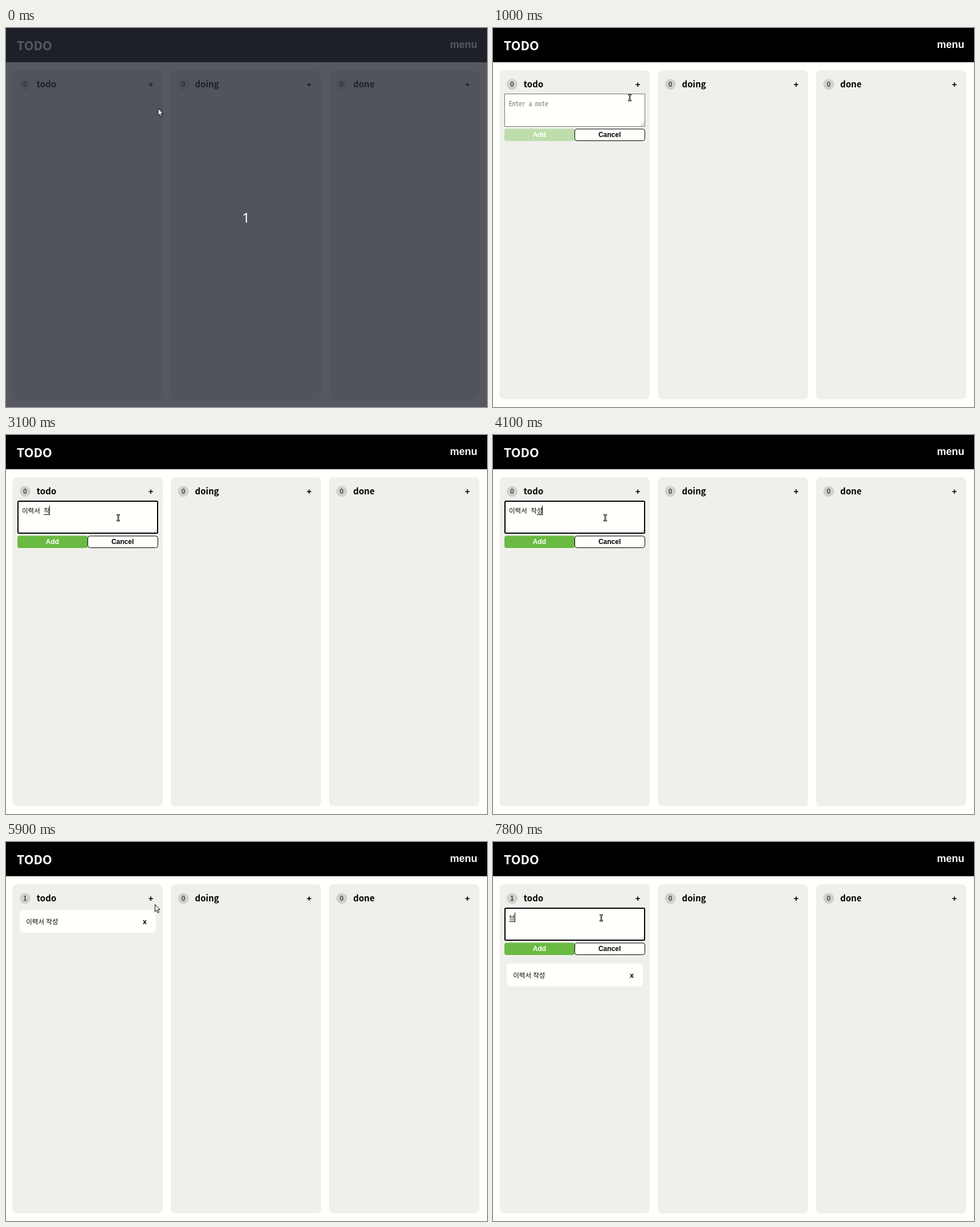
An HTML page for the animation above (8 s loop, 844 by 664 pixels).

```html
<!DOCTYPE html>
<html lang="ko">
<head>
<meta charset="utf-8">
<title>TODO board</title>
<style>
  html, body { margin: 0; width: 100%; height: 100%; overflow: hidden; background: #fffffc; }
  svg { display: block; width: 100vw; height: 100vh; }
  text { font: 11.52px 'Noto Sans CJK KR', 'Noto Sans CJK JP', 'Noto Sans CJK', sans-serif; white-space: pre; }
  .bold { font-weight: 700; }
  .button { font: 700 12px 'Liberation Sans', sans-serif; text-anchor: middle; }
  .mono { font-family: 'Noto Sans Mono CJK KR', 'Noto Sans Mono CJK JP', 'Noto Sans Mono CJK', 'Noto Sans Mono', monospace; }
  .count { text-anchor: middle; fill: #444; }
  #value { word-spacing: .276em; }
</style>
</head>
<body>
<svg viewBox="0 0 844 664">
  <rect width="844" height="664" fill="#fffffc"/>
  <rect width="844" height="60"/>
  <text class="bold" x="18.8" y="39" fill="#fffffc" style="font-size:21.8px">TODO</text>
  <text class="button" x="803" y="35" fill="#fffffc" style="font-size:18px">menu</text>
  <g id="columns"></g>

  <g id="card">
    <rect x="24" y="119" width="239" height="40" rx="7" fill="#fffffc"/>
    <text x="35.2" y="144">이력서 작성</text>
    <text class="button" x="243.4" y="144" style="font-size:12.5px">x</text>
  </g>

  <g id="form">
    <rect id="area" fill="#fffffc"/>
    <path d="M259.5 171.5l6-6M263 171.5l2.5-2.5" stroke="#777" stroke-width=".8"/>
    <text id="hint" class="mono" x="28" y="137" fill="#757575">Enter a note</text>
    <text id="value" x="28" y="137"></text>
    <rect id="underline" y="139" height="1"/>
    <rect id="caret" y="123.5" width="1" height="17"/>
    <rect id="add" x="20" y="176.5" width="123.5" height="21.5" rx="4"/>
    <rect id="ring" x="20" y="177" width="123" height="21" rx="4" fill="none" stroke="#000" stroke-width="2"/>
    <text class="button" x="81.5" y="191" fill="#fffffc">Add</text>
    <rect x="143.5" y="177" width="123" height="20.5" rx="4" fill="#fffffc" stroke="#000"/>
    <text class="button" x="204.6" y="191">Cancel</text>
  </g>

  <g id="countdown">
    <rect width="844" height="664" fill="#262a32" fill-opacity=".78"/>
    <text x="421" y="341" text-anchor="middle" fill="#fff" style="font:24px 'Noto Sans',sans-serif">1</text>
  </g>

  <g id="pointer" fill="#fff" stroke="#000" stroke-linejoin="round">
    <path id="arrow" d="M.5 .5V13L3.4 10.3 5.4 15 7.4 14.1 5.4 9.6H9Z"/>
    <path id="hand" d="M3.4 8V1.4Q4.3 0 5.2 1.4V4.6Q6.4 3.9 7 5Q8.3 4.4 8.9 5.5Q10.6 5 11.2 6.6V9.3L10 12.5H4.4L.8 8.3Q.5 6.5 2 7Z"/>
    <g id="beam" fill="none">
      <path d="M-3 -5H-1L0 -4.3 1 -5H3M-3 5H-1L0 4.3 1 5H3M0 -4.3V4.3" stroke-width="2.6"/>
      <path d="M-2.6 -5H-1L0 -4.3 1 -5H2.6M-2.6 5H-1L0 4.3 1 5H2.6M0 -4.3V4.3" stroke="#fff" stroke-width=".8"/>
    </g>
  </g>
</svg>
<script>
const LOOP = 8000, FONT = 11.52;
const $ = id => document.getElementById(id);
const show = (id, on) => $(id).style.display = on ? '' : 'none';
const set = (id, attrs) => Object.entries(attrs).forEach(([k, v]) => $(id).setAttribute(k, v));

$('columns').innerHTML = ['todo', 'doing', 'done'].map((name, i) => `
  <g transform="translate(${i * 277.75})">
    <rect x="11.5" y="74" width="263.5" height="576.5" rx="8" fill="#eff0ec"/>
    <circle cx="33.5" cy="98.7" r="9.5" fill="#d0d0cd"/>
    <text class="bold count" id="count${i}" x="33.5" y="103">0</text>
    <text class="bold" x="53.8" y="104" style="font-size:15px">${name}</text>
    <text class="button" x="254.1" y="103.6" style="font-size:15px">+</text>
  </g>`).join('');

// [time, pointer shape, x, y]
const moves = [
  [0, 'arrow', 266.5, 140.5], [100, 'arrow', 260, 130], [200, 'arrow', 257, 120],
  [300, 'hand', 251, 105], [400, 'hand', 250, 98], [900, 'hand', 249, 102],
  [1000, 'beam', 240, 122], [1100, 'beam', 220, 135], [1200, 'beam', 203, 143],
  [1300, 'beam', 197, 145], [5000, 'arrow', 195, 142], [5600, 'arrow', 193, 142.5],
  [5800, 'arrow', 272, 125], [5900, 'arrow', 261, 109], [6100, 'hand', 250.5, 107],
  [6300, 'hand', 250.5, 100.5], [6600, 'hand', 250.5, 107], [6800, 'beam', 189.5, 134],
  [7000, 'beam', 190, 133]
];

// [time, committed text, syllable being composed]
const typing = [
  [0, '', ''], [1500, 'd', ''], [1800, '', ''], [2100, '', 'ㅇ'], [2300, '', '이'],
  [2400, '이', '려'], [2500, '이', '력'], [2600, '이력', '서'], [2700, '이력서 ', ''],
  [2800, '이력서 ', '자'], [3100, '이력서 ', '작'], [3500, '이력서 ', '잓'],
  [4000, '이력서 작', '서'], [4100, '이력서 작', '성'], [4500, '이력서 작성', ''],
  [5000, '', ''], [7500, '', 'ㅂ'], [7800, '', '브']
];

const at = (track, t) => track.findLast(step => step[0] <= t);
const within = (t, from, to) => t >= from && t < to;
const textWidth = s => [...s].reduce((w, c) => w + (c > '\u3000' ? .92 : .5) * FONT, 0);

function drawForm(t) {
  const open = within(t, 800, 5000) || t >= 6500;
  const focused = within(t, 1300, 4600) || t >= 6800;
  const [, done, composing] = at(typing, t);
  const value = done + composing;
  const start = 28 + textWidth(done), end = 28 + textWidth(value);
  const line = focused ? 2 : 1;

  show('form', open);
  set('area', {
    x: 20 + line / 2, y: 115 + line / 2, width: 247 - line, height: 58 - line,
    rx: focused ? 1.5 : 0, stroke: focused ? '#000' : '#767676', 'stroke-width': line
  });
  show('hint', !value);
  $('value').textContent = value;
  $('value').classList.toggle('mono', value === 'd');
  set('underline', { x: start + .5, width: Math.max(0, end - start - 1) });
  set('caret', { x: Math.floor(end) });
  show('caret', focused && !within(t, 3700, 4000));
  set('add', { fill: value ? '#6aba43' : '#bdddac' });
  show('ring', within(t, 4600, 5000));

  show('card', t >= 5000);
  set('card', { transform: `translate(0 ${open ? 94 : 0})` });
  $('count0').textContent = t >= 5000 ? 1 : 0;
}

function drawPointer(t) {
  const [, shape, x, y] = at(moves, t);
  ['arrow', 'hand', 'beam'].forEach(id => show(id, id === shape));
  set('pointer', { transform: `translate(${x} ${y})` });
}

function draw(now) {
  const t = now % LOOP;
  show('countdown', t < 100);
  drawForm(t);
  drawPointer(t);
}

const begin = performance.now();
function tick() {
  draw(performance.now() - begin);
  requestAnimationFrame(tick);
}
tick();
</script>
</body>
</html>
```
